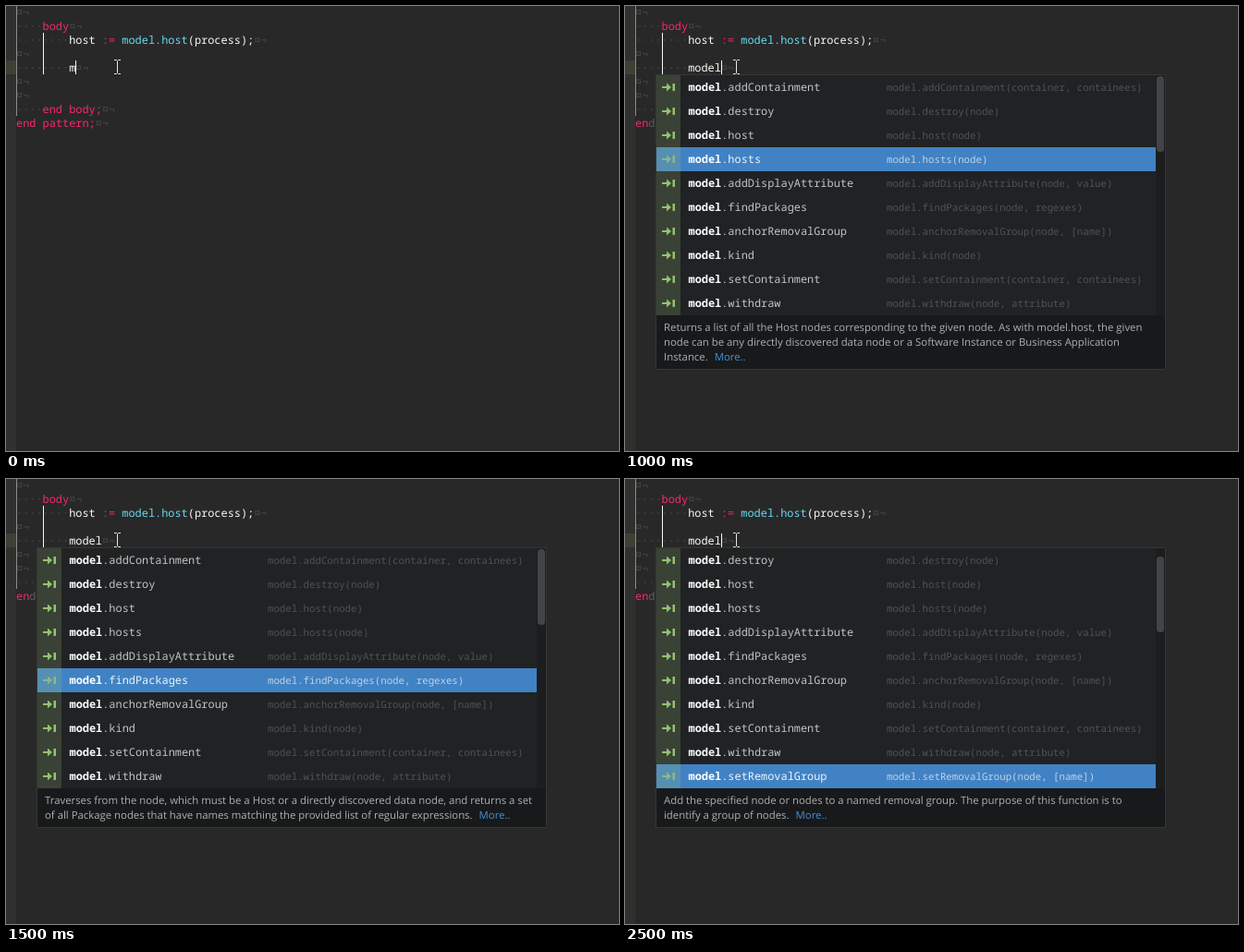
Recreate the animation shown at these times as an HTML page. Size 663 by 482 pixels, loop 3000 ms.

```html
<!DOCTYPE html>
<html lang="en">
<head>
<meta charset="utf-8">
<title>Code completion</title>
<style>
  html, body { margin: 0; width: 100%; height: 100%; overflow: hidden; background: #282828; }
  svg { display: block; }
  text { white-space: pre; text-rendering: geometricPrecision; }
  .code, .name { font: 500 11.91px "Noto Sans Mono", "DejaVu Sans Mono", monospace; fill: #f8f8f2; }
  .name { font-weight: 400; fill: #c2c3c3; }
  .name .b { font-weight: 700; fill: #fff; }
  .k { fill: #f92672; }
  .f { fill: #66d9ef; }
  .w { fill: #4b4b4a; font-weight: 400; }
  .hint { font: 10.73px "Noto Sans Mono", "DejaVu Sans Mono", monospace; fill: #505253; }
  .doc { font: 11.37px "Open Sans", "Noto Sans", sans-serif; fill: #aeb0b0; }
  .more { fill: #4a8fd6; }
  .icon { fill: #93c272; }
  .bar { fill: none; }
  .on .bar { fill: #4182c4; }
  .on .edge { fill: #5590b4; }
  .on .icon { fill: #8fb58a; }
  .on .name { fill: #eef4f9; }
  .on .hint { fill: #bdd3e8; }
  .edge { fill: #3a4235; }
  .open .dim { fill: #5c5e5e; }
</style>
</head>
<body>
<svg id="stage" width="663" height="482" viewBox="0 0 663 482">
  <rect width="663" height="482" fill="#282828"/>
  <rect width="11" height="482" fill="#30302e"/>
  <rect y="59" width="11" height="15" fill="#3f3f36"/>
  <g id="code"></g>
  <rect x="11" width="1" height="119" fill="#8c8c88"/>
  <rect x="40" y="29" width="1" height="45" fill="#f8f8f2"/>
  <rect id="caret" y="59" width="1" height="15" fill="#f8f8f2"/>
  <g id="popup">
    <rect id="frame" x="33.5" y="74.5" width="551" fill="#17191b" stroke="#343637"/>
    <rect x="34" y="75" width="550" height="260" fill="#202224"/>
    <svg x="34" y="75" width="540" height="260"><g id="list"></g></svg>
    <rect x="574" y="75" width="10" height="260" fill="#1b1d1e"/>
    <rect id="thumb" x="575" width="8" height="82" rx="3.5" fill="#424445"/>
    <g id="docs"></g>
  </g>
  <path d="M117 58.5h2.5l1 1 1-1h2.5M120.5 59.5v13M117 73.5h2.5l1-1 1 1h2.5" fill="none" stroke="#e8e8e8"/>
</svg>
<script>
const NS = "http://www.w3.org/2000/svg";
const $ = id => document.getElementById(id);
const ROW = 26, STEP = 500, CHAR = 7.146;

function add(parent, tag, attrs = {}, content = "") {
  const el = document.createElementNS(NS, tag);
  for (const key in attrs) el.setAttribute(key, attrs[key]);
  el.textContent = content;
  return parent.appendChild(el);
}

// Runs are [class, string] pairs laid out in one text line.
function line(parent, x, y, cls, runs) {
  const el = add(parent, "text", { x, y, class: cls });
  for (const [c, s] of runs) add(el, "tspan", { class: c }, s);
  return el;
}

const eol = ["w", "¤¬"];
const dots = n => ["w", "·".repeat(n)];
const code = [
  [eol],
  [dots(4), ["k", "body"], eol],
  [dots(8), ["", "host "], ["k", ":="], ["f", " model.host"], ["", "(process);"], eol],
  [eol],
  [dots(8), ["typed", "m"], eol],
  [eol],
  [eol],
  [dots(4), ["k", "end body;"], eol],
  [["k", "en"], ["k dim", "d"], ["k", " pattern;"], eol]
];
code.forEach((runs, i) => line($("code"), 11, 11 + 15 * i, "code", runs));
const typed = document.querySelector(".typed");

const calls = [
  "addContainment(container, containees)", "destroy(node)", "host(node)", "hosts(node)",
  "addDisplayAttribute(node, value)", "findPackages(node, regexes)",
  "anchorRemovalGroup(node, [name])", "kind(node)",
  "setContainment(container, containees)", "withdraw(node, attribute)",
  "setRemovalGroup(node, [name])"
];
const rows = calls.map((call, i) => {
  const g = add($("list"), "g", { transform: `translate(0 ${i * ROW})` });
  add(g, "rect", { class: "bar", width: 540, height: ROW });
  add(g, "rect", { class: "edge", width: 26, height: ROW });
  add(g, "path", { class: "icon", d: "M6 12h5v-3.5l5 4.5-5 4.5v-3.5h-5zM17.5 9h2.5v8h-2.5z" });
  line(g, 34.5, 17, "name", [["b", "model"], ["", "." + call.split("(")[0]]]);
  add(g, "text", { x: 249, y: 17, class: "hint" }, "model." + call);
  return g;
});

const states = [
  { caret: 75 },
  { row: 1, doc: [
    "Destroy the specified node or relationship in the model. (Not usually used in pattern bodies, but in",
    "removal sections.)"] },
  { row: 3, caret: 104, doc: [
    "Returns a list of all the Host nodes corresponding to the given node. As with model.host, the given",
    "node can be any directly discovered data node or a Software Instance or Business Application",
    "Instance."] },
  { row: 5, doc: [
    "Traverses from the node, which must be a Host or a directly discovered data node, and returns a set",
    "of all Package nodes that have names matching the provided list of regular expressions."] },
  { row: 8, doc: [
    "Equivalent to addContainment, except that at the end of the pattern body, any relationships to",
    "contained nodes that have not been confirmed by setContainment or addContainment calls are",
    "removed."] },
  { row: 10, caret: 104, scroll: 1, doc: [
    "Add the specified node or nodes to a named removal group. The purpose of this function is to",
    "identify a group of nodes."] }
];

function showDoc(doc) {
  $("docs").replaceChildren();
  let last;
  doc.forEach((s, i) => last = line($("docs"), 42, 352 + 16 * i, "doc", [["", s]]));
  add(last, "tspan", { class: "more", dx: 7 }, "More..");
  $("frame").setAttribute("height", 271 + 16 * doc.length);
}

function show({ row, caret, doc, scroll = 0 }) {
  const open = row !== undefined;
  $("stage").classList.toggle("open", open);
  $("popup").style.display = open ? "" : "none";
  typed.textContent = open ? "model" : "m";
  $("caret").style.display = caret ? "" : "none";
  if (caret) $("caret").setAttribute("x", caret);
  if (!open) return;
  rows.forEach((g, i) => g.classList.toggle("on", i === row));
  $("list").setAttribute("transform", `translate(0 ${-scroll * ROW})`);
  $("thumb").setAttribute("y", 76 + scroll * 8);
  showDoc(doc);
}

let current = -1;
const start = performance.now();
function tick() {
  const i = Math.floor((performance.now() - start) / STEP) % states.length;
  if (i !== current) show(states[current = i]);
  requestAnimationFrame(tick);
}
tick();
</script>
</body>
</html>
```
